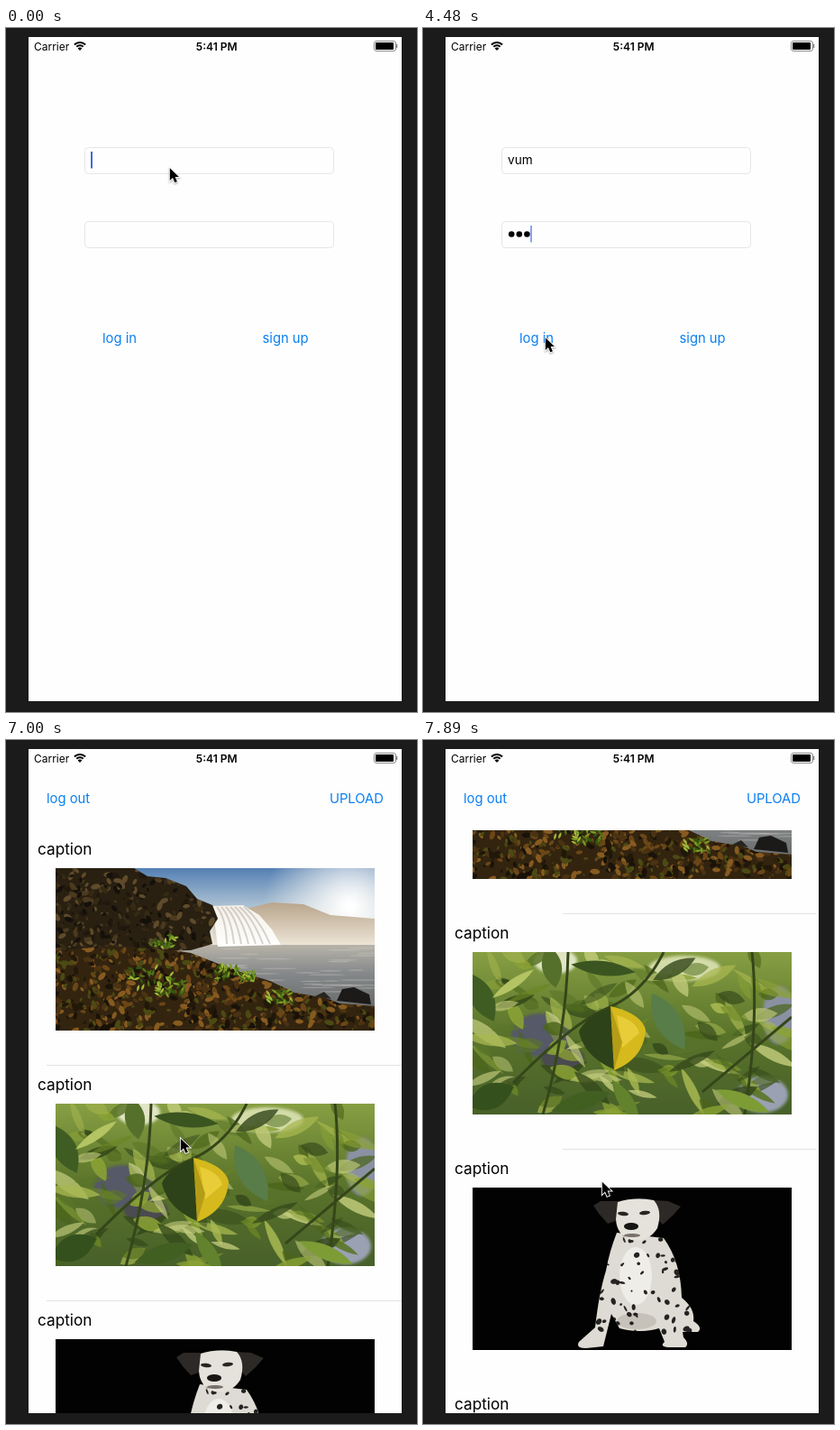
An HTML page with a canvas for the animation above (8 s loop, 456 px wide and 758 px high).

```html
<!DOCTYPE html>
<html lang="en">
<head>
<meta charset="utf-8">
<title>Photo feed login</title>
<style>
html, body { margin: 0; width: 100%; height: 100%; overflow: hidden; background: #1b1b1b; }
canvas { display: block; width: 456px; height: 758px; }
</style>
</head>
<body>
<canvas id="stage"></canvas>
<script>
const W = 456, H = 758, LOOP = 8000, TICK = 148.8;
const BLUE = '#0b7ff0', WHITE = '#fefefe', LINE = '#e3e3e3';
const LEFT = 25, TOP = 10, RIGHT = 439, BOTTOM = 746;
const LIST_TOP = 100, ROW = 261, PHOTO_W = 354, PHOTO_H = 180;

const canvas = document.getElementById('stage');
const dpr = window.devicePixelRatio || 1;
canvas.width = W * dpr;
canvas.height = H * dpr;
const ctx = canvas.getContext('2d');
ctx.scale(dpr, dpr);

const clamp = (v, top) => v < 0 ? 0 : v > top ? top : v;

function rng(seed) {
  return () => (seed = (seed * 16807) % 2147483647) / 2147483647;
}

function text(s, x, y, size, color = '#000', align = 'left', weight = 400) {
  ctx.font = `${weight} ${size}px Inter, "Liberation Sans", sans-serif`;
  ctx.textAlign = align;
  ctx.fillStyle = color;
  ctx.fillText(s, x, y);
}

function rect(x, y, w, h, color) {
  ctx.fillStyle = color;
  ctx.fillRect(x, y, w, h);
}

function shape(c, color, pts) {
  c.fillStyle = color;
  c.beginPath();
  for (let i = 0; i < pts.length; i += 2) c.lineTo(pts[i], pts[i + 1]);
  c.closePath();
  c.fill();
}

function oval(c, color, x, y, rx, ry = rx, turn = 0) {
  c.fillStyle = color;
  c.beginPath();
  c.ellipse(x, y, rx, ry, turn, 0, 7);
  c.fill();
}

function leaf(c, color, x, y, len, wide, turn) {
  c.save();
  c.translate(x, y);
  c.rotate(turn);
  c.fillStyle = color;
  c.beginPath();
  c.moveTo(-len, 0);
  c.quadraticCurveTo(0, -wide * 2, len, 0);
  c.quadraticCurveTo(0, wide * 2, -len, 0);
  c.fill();
  c.restore();
}

function fade(c, y0, y1, ...colors) {
  const g = c.createLinearGradient(0, y0, 0, y1);
  colors.forEach((color, i) => g.addColorStop(i / (colors.length - 1), color));
  return g;
}

function photo(paint) {
  const cv = document.createElement('canvas');
  cv.width = PHOTO_W * 2;
  cv.height = PHOTO_H * 2;
  const c = cv.getContext('2d');
  c.scale(2, 2);
  paint(c);
  return cv;
}

function waterfall(c) {
  const rnd = rng(41);
  const pick = list => list[Math.floor(rnd() * list.length)];
  c.fillStyle = fade(c, 0, 80, '#5480b4', '#a9bfd2', '#f0e8dc');
  c.fillRect(0, 0, PHOTO_W, PHOTO_H);
  const sun = c.createRadialGradient(326, 42, 4, 326, 42, 95);
  sun.addColorStop(0, '#fff');
  sun.addColorStop(1, 'rgba(255,250,240,0)');
  c.fillStyle = sun;
  c.fillRect(200, 0, 154, 100);
  shape(c, fade(c, 38, 86, '#b9a68c', '#eee6d8'),
    [175, 44, 215, 44, 240, 38, 275, 40, 305, 52, 354, 56, 354, 90, 175, 90]);
  c.fillStyle = fade(c, 84, 150, '#b9b5aa', '#85888a', '#6d6f70');
  c.fillRect(120, 85, 234, 70);
  for (let i = 0; i < 35; i++)
    oval(c, 'rgba(215,212,204,.3)', 190 + rnd() * 160, 88 + rnd() * 50, 8 + rnd() * 16, .8);
  shape(c, fade(c, 40, 88, '#f6f0e6', '#fff'),
    [174, 42, 208, 41, 226, 52, 240, 68, 250, 85, 180, 87]);
  c.lineWidth = 2;
  c.strokeStyle = 'rgba(150,150,145,.4)';
  for (let i = 0; i < 7; i++) {
    c.beginPath();
    c.moveTo(179 + i * 5, 43);
    c.quadraticCurveTo(189 + i * 6, 55, 190 + i * 8, 84);
    c.stroke();
  }
  const cliff = new Path2D('M0 0H87L102 9 122 11 145 20 157 34 174 41 180 56 171 70 174 84 150 91 100 92 0 118Z');
  const bank = new Path2D('M0 92L60 86 130 91 150 94 178 105 208 116 238 125 265 138 300 144 315 150 354 153V180H0Z');
  c.fillStyle = '#292011';
  c.fill(cliff);
  const scatter = (clip, count, y0, y1, colors) => {
    c.save();
    c.clip(clip);
    for (let i = 0; i < count; i++) {
      const size = 1.5 + rnd() * 4;
      oval(c, pick(colors), rnd() * PHOTO_W, y0 + rnd() * (y1 - y0), size, size * .55, rnd() * 3);
    }
    c.restore();
  };
  scatter(cliff, 750, 0, 115, ['#4b3a20', '#15100a', '#5f4b2b', '#352a14', '#20180d']);
  c.fillStyle = '#33240f';
  c.fill(bank);
  scatter(bank, 850, 85, 180, ['#6b4616', '#1a1209', '#4b3212', '#875b20', '#211809', '#4b4a14']);
  shape(c, '#1b1a19', [312, 147, 318, 134, 331, 132, 348, 140, 350, 151]);
  shape(c, '#28241e', [288, 142, 298, 137, 306, 145]);
  const bushes = [119, 82, 14, 105, 122, 24, 128, 132, 16, 190, 116, 15, 212, 120, 9, 248, 143, 14];
  for (let i = 0; i < bushes.length; i += 3)
    for (let j = 0; j < 26; j++) {
      const r = bushes[i + 2];
      leaf(c, pick(['#7b9b22', '#4d7418', '#a3b83a', '#355610']),
        bushes[i] + (rnd() * 2 - 1) * r, bushes[i + 1] + (rnd() * 2 - 1) * r * .55, 4, 1.3, rnd() * 6);
    }
}

function foliage(c) {
  const rnd = rng(77);
  const greens = ['#4b651b', '#6b8625', '#8ba235', '#a9b951', '#34491a', '#5b7629', '#c3cd7c'];
  c.fillStyle = fade(c, 0, PHOTO_H, '#879f43', '#5a742b', '#48602a');
  c.fillRect(0, 0, PHOTO_W, PHOTO_H);
  c.filter = 'blur(3px)';
  oval(c, '#e0e5c4', 92, 10, 24, 14);
  oval(c, '#d3dca9', 235, 18, 40, 14);
  oval(c, '#565967', 75, 92, 32, 24);
  oval(c, '#8a91a3', 340, 70, 18, 32);
  oval(c, '#9aa1b2', 322, 158, 28, 20);
  oval(c, '#4a4a51', 100, 118, 24, 14);
  c.filter = 'none';
  for (let i = 0; i < 135; i++) {
    c.globalAlpha = .5 + rnd() * .4;
    leaf(c, greens[Math.floor(rnd() * greens.length)], rnd() * PHOTO_W, rnd() * PHOTO_H,
      10 + rnd() * 20, 3 + rnd() * 5, rnd() * 1.8 - .6);
  }
  c.globalAlpha = 1;
  c.lineWidth = 3;
  c.strokeStyle = '#35461a';
  for (const d of ['M106 0Q104 90 78 180', 'M212 0Q190 45 150 62T45 145', 'M310 0Q318 75 302 180', 'M354 72L255 155'])
    c.stroke(new Path2D(d));
  leaf(c, '#3f5d23', 10, 50, 30, 13, 1.1);
  leaf(c, '#55702b', 88, 16, 24, 11, 1.4);
  leaf(c, '#3b5520', 145, 18, 36, 8, .12);
  leaf(c, '#b4c463', 45, 35, 28, 5, -.6);
  leaf(c, '#587d48', 217, 77, 36, 14, 1.05);
  leaf(c, '#34501d', 20, 160, 28, 14, -.4);
  leaf(c, '#425f22', 120, 166, 34, 10, -.3);
  leaf(c, '#62822d', 170, 165, 28, 8, 1);
  leaf(c, '#7d9c36', 300, 165, 32, 8, .4);
  c.fillStyle = '#2d4218';
  c.fill(new Path2D('M154 61Q124 73 118 88Q124 116 157 130Z'));
  c.fillStyle = '#d6b91c';
  c.fill(new Path2D('M153 60Q187 68 192 86Q190 118 157 131Z'));
  c.fillStyle = '#e8cc38';
  c.fill(new Path2D('M160 70Q182 76 185 90L166 106Z'));
  c.fillStyle = '#b59c17';
  c.fill(new Path2D('M153 60L166 100 157 131Z'));
}

function dog(c) {
  const rnd = rng(19);
  c.fillStyle = '#020202';
  c.fillRect(0, 0, PHOTO_W, PHOTO_H);
  const body = new Path2D('M160 50Q152 70 148 92Q140 118 136 155L118 171Q114 178 126 178L145 176 154 140 163 156Q186 162 207 156L213 171Q207 176 217 177H236Q241 173 234 166L233 160 250 160Q256 155 245 148Q247 134 232 122Q231 82 212 56Z');
  c.fillStyle = '#dedbd4';
  c.fill(body);
  c.save();
  c.clip(body);
  oval(c, '#c6c2ba', 182, 148, 22, 9);
  oval(c, '#efede7', 181, 98, 18, 32);
  for (let i = 0; i < 95; i++)
    oval(c, '#252321', 120 + rnd() * 125, 52 + rnd() * 108, 1 + rnd() * 3, 1 + rnd() * 2, rnd() * 3);
  c.restore();
  shape(c, '#2c2926', [161, 15, 142, 15, 134, 20, 141, 30, 150, 40, 159, 37, 164, 24]);
  shape(c, '#2c2926', [200, 14, 217, 15, 231, 21, 222, 31, 211, 41, 204, 34]);
  c.fillStyle = '#e5e2db';
  c.fill(new Path2D('M161 16Q180 10 201 14Q211 25 205 45Q195 61 176 58Q160 53 159 35Z'));
  oval(c, '#282522', 167, 29, 6, 2.2, .1);
  oval(c, '#282522', 191, 28, 6, 2.2, -.1);
  oval(c, '#171615', 176, 43, 8, 4);
  oval(c, '#77716a', 177, 53, 9, 2);
}

const photos = [waterfall, foliage, dog].map(photo);

// Linear interpolation over [tick, value, value...] keys.
function track(keys, n) {
  let i = 0;
  while (i < keys.length - 2 && n >= keys[i + 1][0]) i++;
  const [a, b] = [keys[i], keys[i + 1]];
  const p = clamp((n - a[0]) / (b[0] - a[0]), 1);
  return a.slice(1).map((v, k) => v + (b[k + 1] - v) * p);
}

const POINTER = [[18, 181, 154.5], [19, 180, 205], [20, 178, 279], [21, 178, 279], [22, 148, 318],
  [29, 131, 345], [30, 135, 342.5], [42, 135, 342.5], [47, 193, 441], [48, 193, 441],
  [49, 187, 401], [50, 157, 262], [51, 155, 262], [52, 172, 385], [53, 198, 489]];
const SCROLL = [[48, 0], [49, 30], [50, 151], [51, 168]];

function caret(x, y, alpha) {
  ctx.globalAlpha = alpha;
  rect(x, y, 2, 18.5, '#4169e1');
  ctx.globalAlpha = 1;
}

function field(y) {
  ctx.strokeStyle = '#e6e6e6';
  ctx.lineWidth = 1;
  ctx.beginPath();
  ctx.roundRect(87.5, y + .5, 276, 29, 4);
  ctx.stroke();
}

function login(n) {
  field(132);
  field(214);
  const user = n < 3 ? '' : n < 5 ? 'vu' : 'vum';
  text(user, 94, 151, 13.6);
  if (n < 9) caret(n < 3 ? 94 : n < 5 ? 112.5 : 120, 137, 1);

  const typed = clamp(n - 12, 3);
  const dots = n >= 28 ? 3 : clamp(typed - 1, 2);
  for (let i = 0; i < dots; i++) oval(ctx, '#000', 98.2 + i * 8.6, 228.5, 3.3);
  if (typed > dots) text('kox'[typed - 1], 94 + dots * 8.6, 233, 13.6);
  if (n >= 9) {
    const x = n >= 28 ? 119 : [94, 101.5, 110.5, 117.5][typed];
    const alpha = n === 9 ? .5 : n < 19 ? 1 : n < 29 ? [.4, 0, 0, .65, 1, 1, .6, 0, 0, .5][n - 19] : .6;
    caret(x, 219, alpha);
  }
  text('log in', 107, 348.5, 14.8, BLUE);
  text('sign up', 284.5, 348.5, 14.8, BLUE);
}

function feed(n, offset) {
  const scroll = track(SCROLL, n)[0];
  ctx.save();
  ctx.translate(0, offset);
  rect(LEFT, TOP, RIGHT - LEFT, BOTTOM - TOP, WHITE);
  text('log out', 45, 70.3, 14.8, BLUE);
  text('UPLOAD', 419, 70.3, 14.8, BLUE, 'right');
  ctx.beginPath();
  ctx.rect(LEFT, LIST_TOP, RIGHT - LEFT, BOTTOM - LIST_TOP);
  ctx.clip();
  if (n < 39) {
    for (let y = 143; y < BOTTOM; y += 44) rect(45, y, 394, 1, LINE);
  } else {
    for (let i = 0; i < 4; i++) {
      const y = LIST_TOP + i * ROW - scroll;
      text('caption', 35, y + 27, 17.2);
      if (n >= 40 && photos[i]) ctx.drawImage(photos[i], 55, y + 42, PHOTO_W, PHOTO_H);
      if (n < 49) rect(45, y + 260, 394, 1, LINE);
      else if (n >= 52 && i < 2) rect(155, y + 260, 281, 1, LINE);
    }
    if (n >= 49 && n < 52) {
      ctx.fillStyle = '#a6a6a6';
      ctx.beginPath();
      ctx.roundRect(433, 102.5 + scroll * .262, 3, 169, 1.5);
      ctx.fill();
    }
  }
  ctx.restore();
}

function statusBar(n) {
  text('Carrier', 31, 24.8, 12);
  text('5:41 PM', 233.7, 24.8, 12, '#000', 'center', 600);
  ctx.strokeStyle = '#000';
  ctx.lineWidth = 2;
  for (const r of [5.2, 8.6]) {
    ctx.beginPath();
    ctx.arc(82, 24.5, r, -Math.PI * .75, -Math.PI * .25);
    ctx.stroke();
  }
  ctx.beginPath();
  ctx.moveTo(82, 25);
  ctx.arc(82, 25, 3.4, -Math.PI * .75, -Math.PI * .25);
  ctx.fillStyle = '#000';
  ctx.fill();

  ctx.strokeStyle = '#8b8b8b';
  ctx.lineWidth = 1;
  ctx.beginPath();
  ctx.roundRect(408.5, 14.5, 24, 11, 2.5);
  ctx.stroke();
  ctx.beginPath();
  ctx.roundRect(410, 16, 20, 8, 1);
  ctx.fill();
  rect(433, 18, 1.3, 4, '#8b8b8b');

  if (n >= 32 && n < 40) {
    for (let i = 0; i < 8; i++) {
      const a = i * Math.PI / 4, shade = 95 + ((i - n + 80) % 8) * 16;
      ctx.strokeStyle = `rgb(${shade},${shade},${shade})`;
      ctx.lineWidth = 1.2;
      ctx.beginPath();
      ctx.moveTo(100 + Math.cos(a) * 2.3, 20 + Math.sin(a) * 2.3);
      ctx.lineTo(100 + Math.cos(a) * 4.8, 20 + Math.sin(a) * 4.8);
      ctx.stroke();
    }
  }
}

const ARROW = new Path2D('M.8.8V14.6L4 11.6 6.3 16.8 8.9 15.7 6.6 10.6H11Z');

function pointer(x, y) {
  ctx.save();
  ctx.translate(x, y);
  ctx.shadowColor = 'rgba(0,0,0,.35)';
  ctx.shadowBlur = 2 * dpr;
  ctx.shadowOffsetY = dpr;
  ctx.lineWidth = 1.8;
  ctx.strokeStyle = '#fff';
  ctx.stroke(ARROW);
  ctx.shadowColor = 'transparent';
  ctx.fillStyle = '#000';
  ctx.fill(ARROW);
  ctx.restore();
}

// Critically damped spring for the sheet sliding in.
function sheetOffset(n) {
  const k = 18.26 * (n * .1492 - 5.563);
  return n > 40 ? 0 : Math.round((BOTTOM - TOP) * (1 + k) * Math.exp(-k));
}

function draw(now) {
  const n = Math.floor((now % LOOP + 2) / TICK);
  rect(0, 0, W, H, '#1b1b1b');
  ctx.save();
  ctx.beginPath();
  ctx.rect(LEFT, TOP, RIGHT - LEFT, BOTTOM - TOP);
  ctx.clip();
  rect(LEFT, TOP, RIGHT - LEFT, BOTTOM - TOP, WHITE);
  if (n < 40) login(n);
  if (n >= 38) feed(n, sheetOffset(n));
  statusBar(n);
  ctx.restore();
  pointer(...track(POINTER, n));
}

const start = performance.now();
function loop() {
  draw(performance.now() - start);
  requestAnimationFrame(loop);
}
loop();
</script>
</body>
</html>
```
